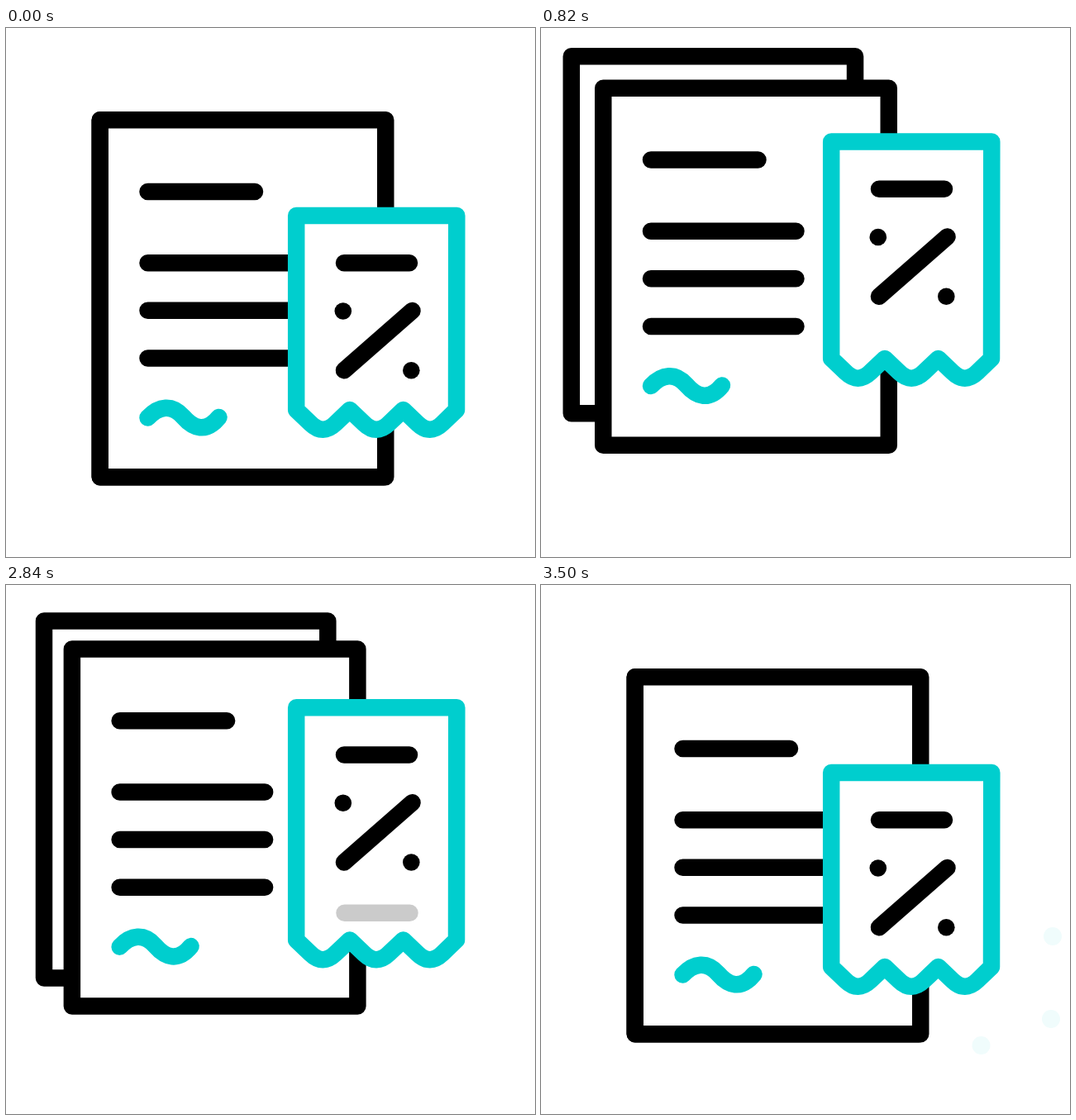
Write an HTML page that moves like this. It is 640x640 px and loops after 3.62 s.

```html
<!DOCTYPE html>
<html lang="en">
<head>
<meta charset="utf-8">
<title>Receipt</title>
<style>
  html, body { margin: 0; width: 100%; height: 100%; overflow: hidden; background: #fff; }
  svg { display: block; width: 100%; height: 100%; }
  .ink { stroke: #000; }
  .teal { stroke: #00cece; }
  .open { fill: none; }
  .paper { fill: #fff; }
</style>
</head>
<body>
<svg viewBox="0 0 640 640" stroke-width="20.5" stroke-linecap="round" stroke-linejoin="round">
  <rect id="back" class="ink paper" x="113.75" y="111.25" width="343.3" height="432"/>
  <g id="front">
    <rect class="ink paper" x="113.75" y="111.25" width="345.5" height="432"/>
    <path class="ink" d="M171.5 198H301M171.5 284.3H347M171.5 341.8H347M171.5 399.5H347"/>
    <path class="teal open" d="M171.5 471.5C185 457 201 455 214 470S242 490 257.5 471"/>
  </g>
  <g id="burst" fill="#00cece">
    <circle r="11"/><circle r="11"/><circle r="11"/>
  </g>
  <g id="receipt">
    <path id="slip" class="teal paper"/>
    <path class="ink" d="M409 284.3H488M409 414.3L491.5 342"/>
    <circle cx="407.8" cy="342.5" r="10.3"/>
    <circle cx="490.3" cy="414.3" r="10.3"/>
    <g id="bars" class="ink">
      <path d="M409.5 475.5H488.5"/>
      <path d="M407.5 538.2H489.5"/>
      <path d="M409 602.2H488"/>
    </g>
  </g>
</svg>
<script>
const LOOP = 3620, STEP = 20;
const $ = id => document.getElementById(id);
const back = $('back'), front = $('front'), receipt = $('receipt'), slip = $('slip'), burst = $('burst');
const bars = [...$('bars').children];
const dots = [...burst.children];
const dotEnds = [[619, 425], [617, 525], [532.5, 557]];
const center = [551, 475];

const ramp = (t, start, length) => Math.min(1, Math.max(0, (t - start) / length));

// Cubic bezier easing (.365, 0, .1, 1), solved by bisection
function ease(x) {
  if (x <= 0 || x >= 1) return x;
  let lo = 0, hi = 1, s;
  for (let i = 0; i < 24; i++) {
    s = (lo + hi) / 2;
    const r = 1 - s;
    if (1.095 * s * r * r + 0.3 * s * s * r + s * s * s < x) lo = s; else hi = s;
  }
  return s * s * (3 - 2 * s);
}

const move = (el, x, y) => el.setAttribute('transform', `translate(${x} ${y})`);

function slipPath(extra) {
  let d = `M545.3 227H351.2V${462 + extra}`;
  for (let i = 0; i < 3; i++) {
    d += 'l17.3 16.5q15 14.5 30 0l' + (i < 2 ? '17.4 -16.5' : '17.1 -16.5');
  }
  return d + 'Z';
}

function draw(t) {
  const rise = ease(ramp(t, 200, 545)) - ease(ramp(t, 2760, 480));
  const grow = ease(ramp(t, 740, 440)) - ease(ramp(t, 2700, 330));

  move(back, -77 * rise, -77 * rise);
  move(front, -38.5 * rise, -38.5 * rise);
  move(receipt, 0, -89.5 * rise);
  slip.setAttribute('d', slipPath(180.5 * grow));

  bars.forEach((bar, i) => {
    const shown = ramp(t, 900 + 100 * i, 100) - ramp(t, 2760 - 40 * i, 100);
    bar.setAttribute('opacity', shown);
  });

  const fly = Math.min(t, 3500);
  const k = 1 - 0.65 * (1 - ramp(fly, 3220, 280)) ** 2;
  burst.setAttribute('opacity', t < 3240 ? 0 : 1 - ramp(fly, 3220, 298));
  dots.forEach((dot, i) => {
    const [x, y] = dotEnds[i].map((end, j) => center[j] + (end - center[j]) * k);
    move(dot, x, y);
  });
}

const began = performance.now();
function tick() {
  const t = (performance.now() - began) % LOOP;
  draw(Math.floor(t / STEP) * STEP);
  requestAnimationFrame(tick);
}
draw(0);
requestAnimationFrame(tick);
</script>
</body>
</html>
```
